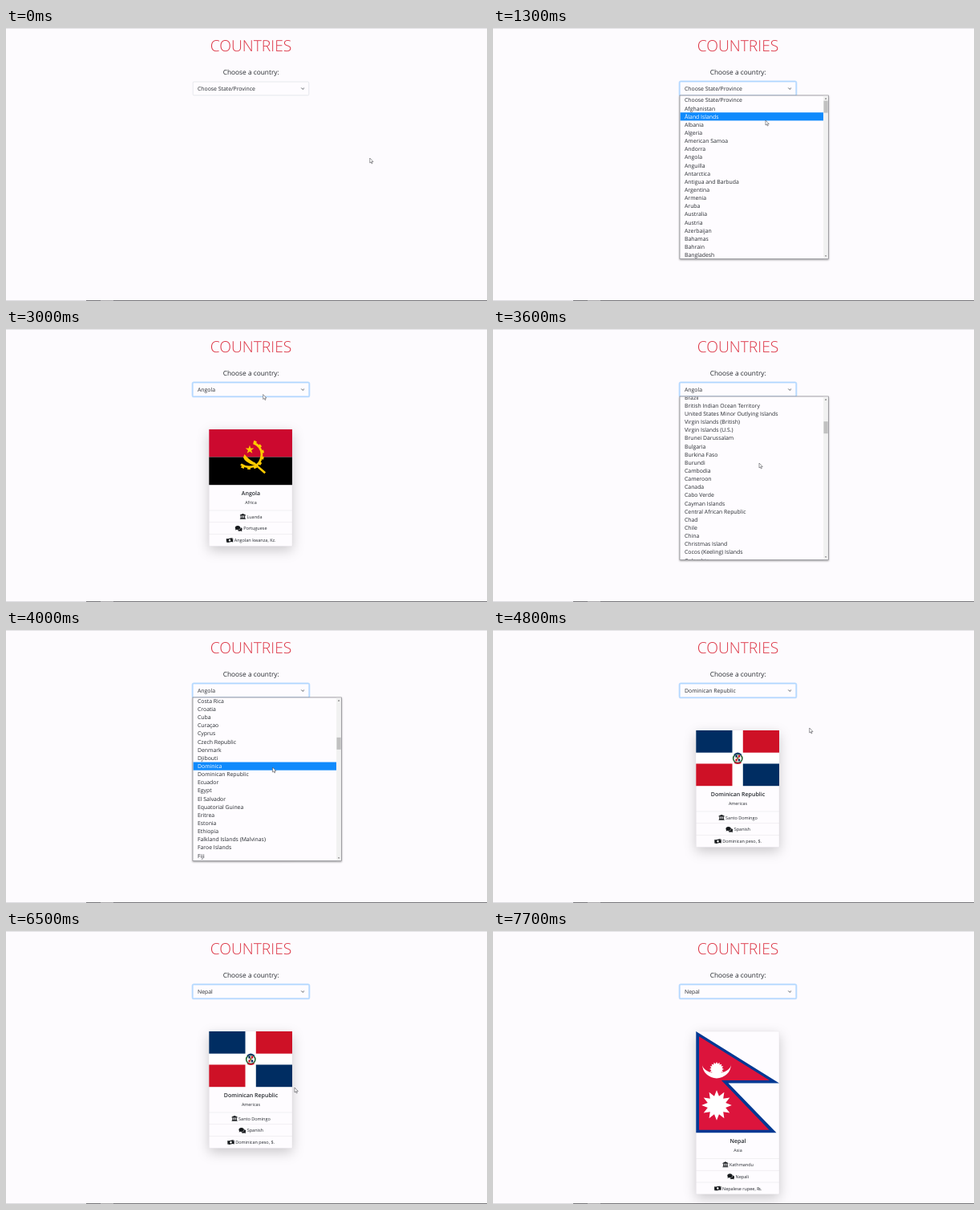
Recreate the animation shown at these times as an HTML page. Size 600 by 340 pixels, loop 8.4 s.

```html
<!DOCTYPE html>
<html lang="en">
<head>
<meta charset="utf-8">
<title>Countries</title>
<style>
html, body { margin: 0; width: 100%; height: 100%; overflow: hidden; background: #fdfbfe; }
svg { display: block; width: 100%; height: 100%; }
text { font-family: "Open Sans", "Noto Sans", sans-serif; fill: #25292e; text-rendering: geometricPrecision; white-space: pre; }
.mid { text-anchor: middle; }
.item { font-size: 6.87px; }
.small { font-size: 5.5px; }
.card { filter: drop-shadow(0 5px 7.5px rgba(0, 0, 0, .2)); }
.menu { filter: drop-shadow(.6px 1px 1.2px rgba(0, 0, 0, .4)); }
</style>
</head>
<body>
<svg viewBox="0 0 600 340">
  <defs>
    <clipPath id="clip"><rect x="233.4" y="84.4" width="184.6" height="202.8"/></clipPath>
    <path id="landmark" d="M3.5 0L7 1.6V2.4H0V1.6ZM.8 2.8H1.9V5.2H.8ZM3 2.8H4V5.2H3ZM5.1 2.8H6.2V5.2H5.1ZM.5 5.3H6.5V6H.5ZM0 6.2H7V7H0Z"/>
    <g id="comments">
      <ellipse cx="3.2" cy="2.7" rx="3.2" ry="2.5"/>
      <path d="M.7 3.5Q.7 4.8 0 5.5Q1.3 5.5 2.2 4.8ZM6.9 2.1C8 2.5 8.8 3.4 8.8 4.5Q8.8 5.3 8.1 6Q8.3 6.7 8.8 7.2Q7.8 7.2 7 6.7C5.4 7.1 3.5 6.7 2.8 5.6C5.2 5.7 7 4.3 6.9 2.1Z"/>
    </g>
    <g id="money">
      <path d="M0 1.2Q2 2 4.2 1.1T8.4 1.1V5.8Q6.3 5 4.2 5.9T0 5.9Z"/>
      <ellipse cx="4.2" cy="3.5" rx="1.1" ry="1.4" fill="#fff"/>
      <path d="M.6 4.7L1.5 5.5H.6ZM7.8 1.6V2.5L6.9 1.6Z" fill="#fff"/>
    </g>
  </defs>
  <rect width="600" height="1" fill="#e3e2e5"/>
  <path d="M0 339.5H100" stroke="#dddce0"/>
  <path d="M100 339.5H600" stroke="#77767a"/>
  <path d="M118 339.5H134" stroke="#aaa9ac"/>
  <text class="mid" x="305.5" y="29.2" font-size="19.3" font-weight="300" style="fill:#dc3545">COUNTRIES</text>
  <text class="mid" x="305.7" y="58" font-size="8.35">Choose a country:</text>
  <g id="cards"></g>
  <rect id="ring" x="232.4" y="66.2" width="146.2" height="18.4" rx="1.8" fill="none" stroke="#bfdeff" stroke-width="1.5"/>
  <rect id="box" x="233.2" y="67" width="144.6" height="16.8" rx="1.2" fill="#fefcff" stroke-width=".5"/>
  <text id="value" class="item" x="239" y="78"></text>
  <path d="M368.3 74.5L370.2 76.4 372.1 74.5" fill="none" stroke="#343a40" stroke-width=".8"/>
  <g id="menu" class="menu">
    <rect x="233" y="84" width="185.5" height="203.6" fill="#fefcff" stroke="#85858a" stroke-width=".7"/>
    <g clip-path="url(#clip)">
      <g id="rows"><rect id="hover" x="233.4" width="178.8" height="10.14" fill="#0f8afc"/></g>
      <rect x="412.2" y="84.4" width="5.8" height="203" fill="#f1f1f1"/>
      <rect id="thumb" x="412.5" width="5.2" height="15" fill="#c1c1c1"/>
      <path d="M413.9 88.4L415.1 87 416.3 88.4ZM413.9 283.4L415.1 284.8 416.3 283.4Z" fill="#505050"/>
    </g>
  </g>
  <path id="cursor" d="M0 0V6L1.4 4.8 2.4 7 3.3 6.6 2.4 4.5H4.3Z" fill="#fff" stroke="#45454a" stroke-width=".55"/>
</svg>
<script>
const LOOP = 8400, TICK = 100, MOVE = 400;
const ROW = 10.14, TOP = 84.93, VIEW = 202.7, TOTAL = 251;
const MID = 305.5, X = 253.3, Y = 125, W = 103.7;
const $ = id => document.getElementById(id);
const names = `Choose State/Province|Afghanistan|Åland Islands|Albania|Algeria|American Samoa|Andorra|Angola|Anguilla|Antarctica|Antigua and Barbuda|Argentina|Armenia|Aruba|Australia|Austria|Azerbaijan|Bahamas|Bahrain|Bangladesh|Barbados|Belarus|Belgium|Belize|Benin|Bermuda|Bhutan|Bolivia (Plurinational State of)|Bonaire, Sint Eustatius and Saba|Bosnia and Herzegovina|Botswana|Bouvet Island|Brazil|British Indian Ocean Territory|United States Minor Outlying Islands|Virgin Islands (British)|Virgin Islands (U.S.)|Brunei Darussalam|Bulgaria|Burkina Faso|Burundi|Cambodia|Cameroon|Canada|Cabo Verde|Cayman Islands|Central African Republic|Chad|Chile|China|Christmas Island|Cocos (Keeling) Islands|Colombia|Comoros|Congo|Congo (Democratic Republic of the)|Cook Islands|Costa Rica|Croatia|Cuba|Curaçao|Cyprus|Czech Republic|Denmark|Djibouti|Dominica|Dominican Republic|Ecuador|Egypt|El Salvador|Equatorial Guinea|Eritrea|Estonia|Ethiopia|Falkland Islands (Malvinas)|Faroe Islands|Fiji|Finland|France|French Guiana|French Polynesia|French Southern Territories|Gabon|Gambia|Georgia|Germany|Ghana|Gibraltar|Greece|Greenland|Grenada|Guadeloupe|Guam|Guatemala|Guernsey|Guinea|Guinea-Bissau|Guyana|Haiti|Heard Island and McDonald Islands|Holy See|Honduras|Hong Kong|Hungary|Iceland|India|Indonesia|Côte d'Ivoire|Iran (Islamic Republic of)|Iraq|Ireland|Isle of Man|Israel|Italy|Jamaica|Japan|Jersey|Jordan|Kazakhstan|Kenya|Kiribati|Kuwait|Kyrgyzstan|Lao People's Democratic Republic|Latvia|Lebanon|Lesotho|Liberia|Libya|Liechtenstein|Lithuania|Luxembourg|Macao|Macedonia (the former Yugoslav Republic of)|Madagascar|Malawi|Malaysia|Maldives|Mali|Malta|Marshall Islands|Martinique|Mauritania|Mauritius|Mayotte|Mexico|Micronesia (Federated States of)|Moldova (Republic of)|Monaco|Mongolia|Montenegro|Montserrat|Morocco|Mozambique|Myanmar|Namibia|Nauru|Nepal|Netherlands|New Caledonia|New Zealand|Nicaragua|Niger|Nigeria|Niue|Norfolk Island|Northern Mariana Islands|Norway|Oman|Pakistan|Palau`.split("|");

const rect = (x, y, w, h, fill) => `<rect x="${x}" y="${y}" width="${w}" height="${h}" fill="${fill}"/>`;
function star(cx, cy, n, R, r, fill) {
  const pts = Array.from({ length: 2 * n }, (_, i) => {
    const a = i * Math.PI / n - Math.PI / 2, d = i % 2 ? r : R;
    return (cx + d * Math.cos(a)).toFixed(2) + "," + (cy + d * Math.sin(a)).toFixed(2);
  });
  return `<polygon points="${pts.join(" ")}" fill="${fill}"/>`;
}
// four corner blocks, the colours swapped on the second row
const quarters = (x, y, w, h, dx, dy, a = "#002d62", b = "#ce1126") =>
  [0, 1, 2, 3].map(i => {
    const col = i % 2, row = i >> 1;
    return rect(x + col * dx, y + row * dy, w, h, col === row ? a : b);
  }).join("");

const angola = rect(X, Y, W, 34.5, "#cc092f") + rect(X, Y + 34.5, W, 34.7, "#000") +
  `<g fill="none" stroke="#ffcb00">
    <path d="M308.6 141.9A15 15 0 0 1 319 156Q318 172 303 171.8 297 171.5 293 168.5" stroke-width="2.8"/>
    <path d="M309 140.2A17 17 0 0 1 320.6 156Q319.5 173.5 303 173.4 296 173 292 170" stroke-width="3" stroke-dasharray="3.6 4.2"/>
    <path d="M309 167L323.2 179.2" stroke-width="2.6"/>
  </g>
  <path d="M297.5 156Q302 162 311 167L309 169.5Q298 166 296 160Z" fill="#ffcb00"/>` +
  star(304, 150.3, 5, 5.6, 2.2, "#ffcb00");

const dominican = rect(X, Y, W, 69.2, "#fff") + quarters(X, Y, 45.2, 27.7, 58.5, 41.5) +
  `<g fill="none" stroke-width="1.7">
    <ellipse cx="305.3" cy="160" rx="5.6" ry="5.4" stroke="#2c6a3c"/>
    <path d="M300.8 155.6Q305.3 151 309.8 155.6" stroke="#14346b"/>
    <path d="M301.2 165Q305.3 167.2 309.4 165" stroke="#c3152b"/>
  </g>` +
  rect(302.4, 155.8, 5.8, 7.6, "#fff") + quarters(302.4, 155.8, 2.4, 2.9, 3.4, 4.7) +
  rect(304.2, 158, 2.2, 3.2, "#8c7436");

const nepal = `<polygon points="253.3,125 357,189.5 293.5,189.5 353.5,251.3 253.3,251.3" fill="#003893"/>
  <polygon points="257,131.2 345,186 285,186 344.5,247.7 257,247.7" fill="#dc143c"/>
  <path d="M261 166A18 17.4 0 0 0 297 166A18 11 0 0 1 261 166Z" fill="#fff"/>` +
  star(279, 172, 16, 9, 6.7, "#fff") + star(279, 217, 12, 18.8, 11.6, "#fff");

const icons = [["landmark", 7], ["comments", 8.8], ["money", 8.4]];
function card(flag, height, name, region, labels) {
  const y = Y + height;
  const lines = labels.map((label, i) => {
    const top = y + 32 + i * 14.85;
    return rect(X, top - .2, W, .4, "#dcdbdf") +
      `<g class="line"><use href="#${icons[i][0]}" y="${top + 4}" fill="#16191c"/>` +
      `<text class="small" y="${top + 9.5}">${label}</text></g>`;
  }).join("");
  return `<g><rect class="card" x="${X}" y="${Y}" width="${W}" height="${height + 76.5}" rx=".8" fill="#fefcff" stroke="#d8d7db" stroke-width=".3"/>${flag}
    <text class="mid" x="${MID}" y="${y + 13}" font-size="7" font-weight="600">${name}</text>
    <text class="mid" x="${MID}" y="${y + 23.9}" font-size="5.4">${region}</text>${lines}</g>`;
}
$("cards").innerHTML =
  card(angola, 69, "Angola", "Africa", ["Luanda", "Portuguese", "Angolan kwanza, Kz."]) +
  card(dominican, 69, "Dominican Republic", "Americas", ["Santo Domingo", "Spanish", "Dominican peso, $."]) +
  card(nepal, 126.3, "Nepal", "Asia", ["Kathmandu", "Nepali", "Nepalese rupee, ₨."]);
const cards = [...$("cards").children];

// centre each icon with its label
document.querySelectorAll(".line").forEach((line, i) => {
  const [icon, label] = line.children, gap = icons[i % 3][1] + 1.5;
  const left = MID + .2 - (gap + label.getComputedTextLength()) / 2;
  icon.setAttribute("x", left);
  label.setAttribute("x", left + gap);
});

const rows = names.map((name, i) => {
  const el = document.createElementNS("http://www.w3.org/2000/svg", "text");
  el.setAttribute("class", "item");
  el.setAttribute("x", 239);
  el.setAttribute("y", (92.4 + i * ROW).toFixed(2));
  el.textContent = name;
  return $("rows").appendChild(el);
});

// "top" is the first visible row once the wheel has stopped
const visits = [
  { open: 800, close: 1700, card: 1900, pick: "Angola", top: 0 },
  { open: 3100, close: 4300, card: 4500, pick: "Dominican Republic", top: 57.15 },
  { open: 5300, close: 6200, card: 6700, pick: "Nepal", top: 150.8 }
].map(v => ({ ...v, pick: names.indexOf(v.pick) }));

// cursor stops: arrival time, x, y
const stops = [
  [0, 453.8, 162], [500, 334, 76], [1300, 340, 115], [1600, 338, 160], [3000, 320.7, 81.5],
  [3600, 332, 167], [4200, 333, 175], [4600, 450, 174], [5000, 339.5, 70], [5500, 340.5, 153],
  [6500, 360, 195], [6900, 450, 209], [7600, 533, 284]
];

const smooth = (t, from, to) => {
  const u = Math.min(1, Math.max(0, (t - from) / (to - from)));
  return u * u * (3 - 2 * u);
};
const show = (el, on) => { el.style.display = on ? "" : "none"; };

function cursorAt(t) {
  const i = stops.findIndex(s => s[0] > t);
  if (i < 0) return stops[stops.length - 1].slice(1);
  const [t0, x0, y0] = stops[i - 1], [t1, x1, y1] = stops[i];
  const u = smooth(t, Math.max(t0, t1 - MOVE), t1);
  return [x0 + (x1 - x0) * u, y0 + (y1 - y0) * u];
}
function scrollAt(t, visit, pick) {
  const start = Math.max(0, (pick + 1) * ROW - VIEW);
  return start + (visit.top * ROW - start) * smooth(t, visit.open + 260, visit.open + 700);
}

let last = -1;
function draw(t) {
  const [x, y] = cursorAt(t);
  const closed = visits.filter(v => t >= v.close);
  const pick = closed.length ? closed[closed.length - 1].pick : 0;
  const visit = visits.find(v => t >= v.open && t < v.close);
  const shown = visits.filter(v => t >= v.card).length - 1;
  const focus = t >= visits[0].open;
  $("cursor").setAttribute("transform", `translate(${x} ${y})`);
  show($("cursor"), t < 7700);
  cards.forEach((el, i) => show(el, i === shown));
  show($("ring"), focus);
  $("box").setAttribute("stroke", focus ? "#80bdff" : "#ced4da");
  $("value").textContent = names[pick];
  show($("menu"), visit);
  if (!visit) return;
  const offset = scrollAt(t, visit, pick);
  // the highlight trails the wheel by one tick
  const under = Math.floor((y - TOP + scrollAt(t - TICK, visit, pick)) / ROW);
  const lit = y < TOP ? pick : under;
  $("rows").setAttribute("transform", `translate(0 ${-offset})`);
  $("hover").setAttribute("y", TOP + lit * ROW);
  rows.forEach((el, i) => { el.style.fill = i === lit ? "#fff" : ""; });
  $("thumb").setAttribute("y", 90.6 + offset / (TOTAL * ROW) * 190);
}
function frame(now) {
  const t = Math.floor((now % LOOP) / TICK) * TICK;
  if (t !== last) draw(last = t);
  requestAnimationFrame(frame);
}
draw(0);
requestAnimationFrame(frame);
</script>
</body>
</html>
```
